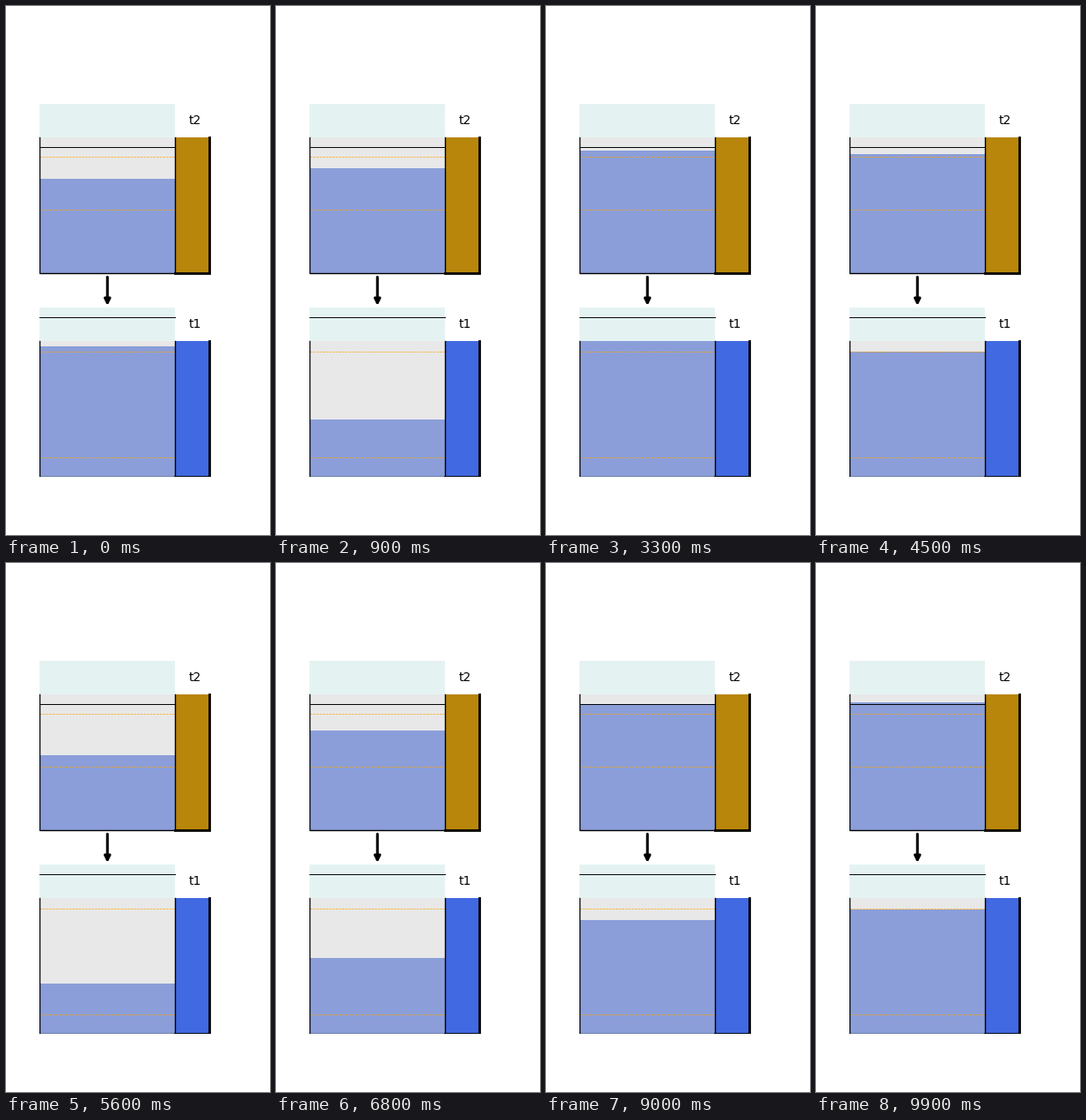
Animation, 300 px wide and 600 px high, one loop 10000 ms. Source, as a matplotlib script:

```python
import numpy as np
import matplotlib.pyplot as plt
from matplotlib.animation import FuncAnimation
from matplotlib.patches import Rectangle

FRAMES, STEP = 100, 100
UNIT = 38.5              # pixels per axis unit

# water surface (pixels from the top) at the start, and its steady rise
START = np.array([196, 386])
REFILL = np.array([2.3, 2.4])

# start, end, how far the upper and the lower surface drop meanwhile
DRAWS = [
    (1, 6, 6, 102),      # first demand on the lower tank
    (18, 28, 7, 0),      # upper tank nearly full, inflow slows
    (28, 33, 29, -31),   # valve open: upper feeds lower
    (33, 45, 31, 41),    # steady use
    (45, 48, 45, 135),   # large demand
    (48, 50, 30, -24),   # valve open again
    (80, 99, 39, 19),    # steady use
]


def to_y(px):
    return (534 - px) / UNIT


def surfaces(i):
    px = START - REFILL * max(i - 1, 0)
    for begin, end, *drop in DRAWS:
        px = px + np.array(drop) * np.clip((i - begin) / (end - begin), 0, 1)
    return to_y(px)


def box(x, y, w, h, color, z):
    patch = Rectangle((x, y), w, h, fc=color, ec="none", lw=0, zorder=z)
    return ax.add_patch(patch)


def line(xs, ys, color="black", lw=1.0, ls="-", z=5):
    ax.plot(xs, ys, color=color, lw=lw, ls=ls, zorder=z,
            solid_capstyle="projecting", solid_joinstyle="miter")


def tank(base, name, color, limit, marks):
    """Draw one tank with its side column; return the water patch."""
    top = base + 4
    box(0, base, 4, 4, "#e8e8e8", 1)
    box(0, top, 4, 1, "#e4f3f2", 1)
    water = box(0, base, 4, 1, "#8b9ed9", 2)
    for px in marks:
        line([0, 4], [to_y(px)] * 2, "orange", 0.5, "--", 3)
    line([0, 4], [to_y(limit)] * 2, lw=0.7)
    box(4, base, 1, 4, color, 4)
    line([0, 0, 4, 4], [top, base, base, top], lw=1)
    line([4, 5, 5], [base, base, top], lw=2)
    ax.text(4.4, top + 0.4, name, fontsize=10, family="DejaVu Sans")
    return water


fig = plt.figure(figsize=(3, 6), dpi=100, facecolor="white")
ax = fig.add_axes([38.25 / 300, 66 / 600, 231 / 300, 462 / 600])
ax.set_xlim(0, 6)
ax.set_ylim(0, 12)
ax.axis("off")

upper = tank(6, "t2", "#b8860b", 160, (171, 231))
lower = tank(0, "t1", "#4169e1", 353, (392, 512))
ax.annotate("", xy=(2, 5.04), xytext=(2, 5.885), zorder=6,
            arrowprops=dict(arrowstyle="-|>", lw=2.2, color="black",
                            shrinkA=0, shrinkB=0, mutation_scale=10))


def draw(i):
    high, low = surfaces(i)
    upper.set_height(high - 6)
    lower.set_height(low)
    return upper, lower


anim = FuncAnimation(fig, draw, frames=FRAMES, interval=STEP,
                     repeat=True, repeat_delay=0)
plt.show()
```
